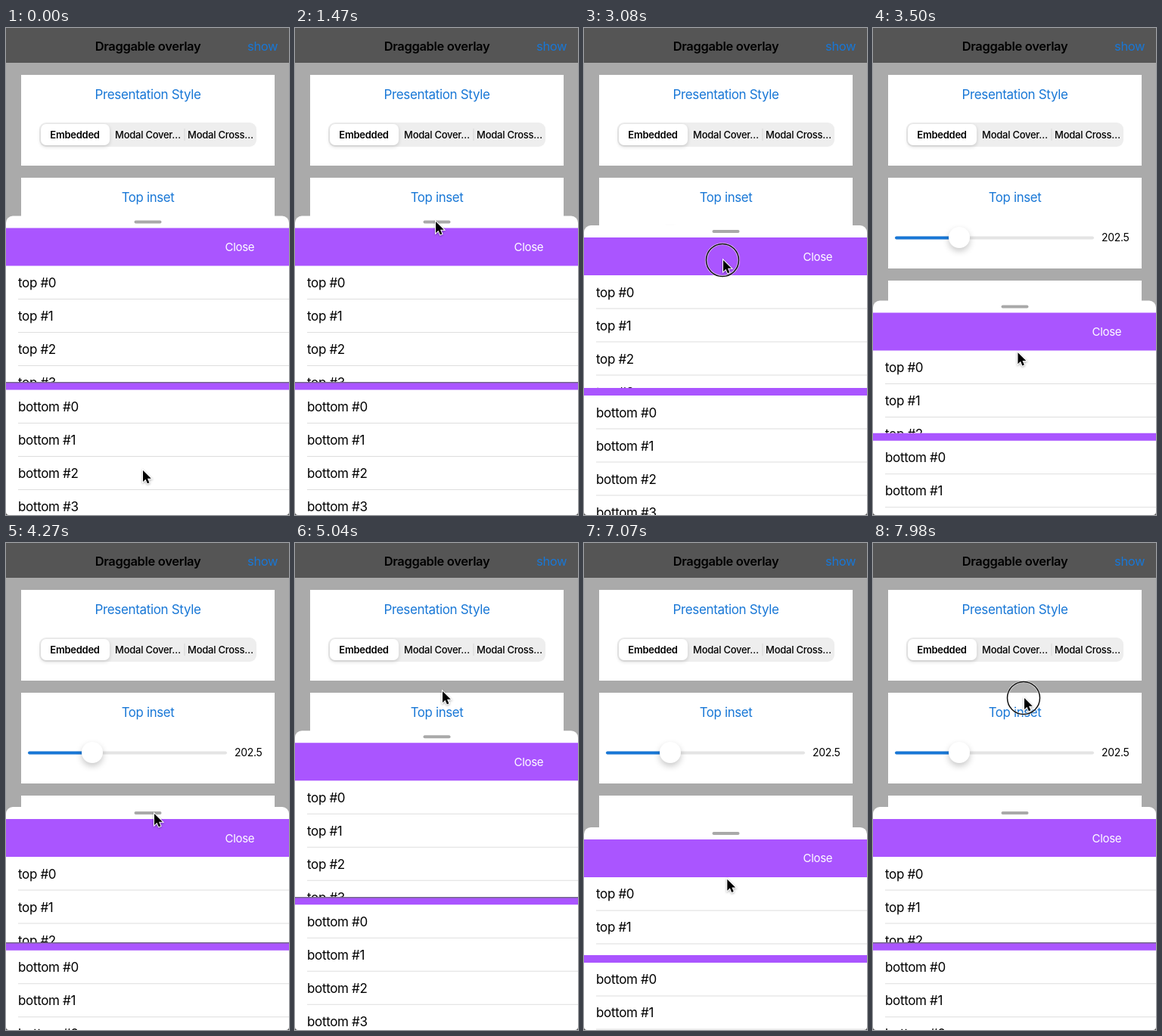
Recreate the animation shown at these times as an HTML page with a canvas. Size 374 px wide and 644 px high, loop 8000 ms.

```html
<!DOCTYPE html>
<html>
<head>
<meta charset="utf-8">
<style>
  html, body { margin: 0; width: 100%; height: 100%; overflow: hidden; background: #aaa; }
  canvas { display: block; }
</style>
</head>
<body>
<canvas id="stage" width="374" height="644"></canvas>
<script>
const W = 374, H = 644, LOOP = 8000;
const BLUE = '#1877d6', PURPLE = '#aa55ff';
const OPEN_Y = 248.5, DROP = 100.5;
const ctx = document.getElementById('stage').getContext('2d');

// Pointer tip: time, x, y
const pointer = [
  [0, 181, 585], [70, 181, 580], [560, 185, 256], [1470, 186, 256], [1540, 185, 257],
  [1650, 185, 257], [1820, 186, 110], [1930, 186, 90], [2240, 181, 150], [2520, 178, 201],
  [2800, 183, 257], [2920, 183, 257], [3080, 184, 307], [3220, 187, 420], [3340, 189, 445],
  [3700, 194, 395], [4000, 196, 360], [4270, 196, 358], [4410, 196, 357], [4550, 197, 205],
  [4680, 197, 99], [4830, 196, 122], [5040, 195, 196], [5390, 196, 270], [5530, 194, 257],
  [5650, 194, 257], [5810, 190, 110], [5900, 188, 92], [6160, 184, 195], [6440, 182, 254],
  [6510, 183, 256], [6630, 183, 257], [6790, 184, 307], [6930, 187, 420], [7050, 189, 445],
  [7420, 195, 390], [7700, 198, 357], [7860, 199, 357], [7980, 200, 205], [8000, 200, 180]
];

// Sheet moves, with times counted from the start of the gesture
const bounce = [[0, 0], [160, -28], [310, -5], [420, -0.6], [560, 0]];
const lower = [[0, 0], [70, 12.5], [210, 90], [330, 128], [490, 112], [700, 101], [790, DROP]];
const raise = [[0, DROP], [160, 5], [270, -18], [400, -3], [480, -0.3], [740, 0]];
const at = (start, keys) => keys.map(([t, d]) => [start + t, d]);
const sheet = [
  [0, 0], ...at(1750, bounce), ...at(3010, lower), ...at(4560, raise),
  ...at(5740, bounce), ...at(6720, lower), [8000, DROP]
];

const presses = [[1640, 1930], [2880, 3290], [4340, 4680], [5640, 5890], [6610, 7000], [7850, 8000]];

// Monotone cubic interpolation of column c
function track(keys, t, c = 1) {
  let i = 0;
  while (i < keys.length - 2 && t >= keys[i + 1][0]) i++;
  const slope = k => k < 0 || k > keys.length - 2 ? 0 :
    (keys[k + 1][c] - keys[k][c]) / (keys[k + 1][0] - keys[k][0]);
  const tangent = k => {
    const a = slope(k - 1), b = slope(k);
    return a * b > 0 ? 2 * a * b / (a + b) : 0;
  };
  const span = keys[i + 1][0] - keys[i][0];
  const u = Math.min(1, Math.max(0, (t - keys[i][0]) / span)), v = 1 - u;
  return v * v * (1 + 2 * u) * keys[i][c] + u * u * (3 - 2 * u) * keys[i + 1][c] +
    span * u * v * (v * tangent(i) - u * tangent(i + 1));
}

function rect(x, y, w, h, color, radius = 0) {
  ctx.fillStyle = color;
  ctx.beginPath();
  ctx.roundRect(x, y, w, h, radius);
  ctx.fill();
}

function text(str, x, y, size, color = '#000', align = 'center', weight = 400) {
  ctx.font = `${weight} ${size}px Inter, "Liberation Sans", sans-serif`;
  ctx.letterSpacing = -0.02 * size + 'px';
  ctx.textAlign = align;
  ctx.fillStyle = color;
  ctx.fillText(str, x, y);
}

function shadowed(blur, dy, alpha, draw) {
  ctx.save();
  ctx.shadowColor = `rgba(0,0,0,${alpha})`;
  ctx.shadowBlur = blur;
  ctx.shadowOffsetY = dy;
  draw();
  ctx.restore();
}

function drawPage() {
  rect(0, 0, W, H, '#aaa');
  rect(0, 0, W, 46, '#555');
  text('Draggable overlay', 187.5, 30, 16.5, '#000', 'center', 600);
  text('show', 319, 30, 16.5, BLUE, 'left');
  for (const y of [62, 198, 334]) rect(20, y, 335, 120, '#fff');

  text('Presentation Style', 187.5, 94, 17, BLUE);
  rect(44, 125, 287, 32, '#eee', 9);
  shadowed(5, 2, 0.16, () => rect(46, 127, 91, 28, '#fff', 7));
  rect(235.5, 133, 1, 16, '#d5d5d5');
  text('Embedded', 91, 145.5, 13, '#000', 'center', 600);
  text('Modal Cover…', 187.5, 145.5, 13, '#000', 'center', 500);
  text('Modal Cross…', 283.5, 145.5, 13, '#000', 'center', 500);

  text('Top inset', 187.5, 230, 16.8, BLUE);
  rect(29, 275.5, 263, 4, '#e4e4e4', 2);
  rect(29, 275.5, 85, 4, BLUE, 2);
  shadowed(9, 4, 0.22, () => rect(100, 263, 28, 28, '#fff', 14));
  text('202.5', 302, 282, 14, '#000', 'left');
}

function drawList(name, top, bottom) {
  ctx.save();
  ctx.beginPath();
  ctx.rect(0, top, W, bottom - top);
  ctx.clip();
  rect(0, top, W, bottom - top, '#fff');
  for (let i = 0, y = top; y < bottom; i++, y += 44) {
    text(`${name} #${i}`, 16, y + 28.5, 17, '#000', 'left');
    rect(16, y + 43.5, W - 16, 1, '#dedede');
  }
  ctx.restore();
}

function drawSheet(d) {
  const y = OPEN_Y + d, bar = 468.5 + 0.6 * d;
  rect(0, y, W, H, '#fff', [9, 9, 0, 0]);
  rect(169.5, y + 6, 36, 4, '#a9a9a9', 2);
  drawList('top', y + 66, bar);
  rect(0, y + 16, W, 50, PURPLE);
  text('Close', 289.5, y + 46.5, 15, '#fff', 'left');
  drawList('bottom', bar + 10, H);
  rect(0, bar, W, 10, PURPLE);
  const resting = Math.min(Math.abs(d), Math.abs(d - DROP)) < 0.4;
  if (resting) rect(0, Math.round(bar - 0.6), W, 1.5, '#75688a');
}

function drawPointer(x, y, pressed) {
  if (pressed) {
    ctx.beginPath();
    ctx.arc(x - 1, y, 21.5, 0, 2 * Math.PI);
    ctx.strokeStyle = 'rgba(255,255,255,.6)';
    ctx.lineWidth = 3.2;
    ctx.stroke();
    ctx.strokeStyle = '#111';
    ctx.lineWidth = 1.5;
    ctx.stroke();
  }
  const arrow = new Path2D('M0 0V15L3.5 11.7 5.9 17.3 8.4 16.2 6 10.8H10.8Z');
  ctx.save();
  ctx.translate(x, y);
  shadowed(3, 1, 0.35, () => {
    ctx.strokeStyle = '#fff';
    ctx.lineWidth = 2;
    ctx.stroke(arrow);
  });
  ctx.fillStyle = '#000';
  ctx.fill(arrow);
  ctx.restore();
}

// Dark slivers left by the rounded window corners
function drawCorners() {
  ctx.fillStyle = '#555';
  ctx.beginPath();
  ctx.rect(0, H - 5, W, 5);
  ctx.roundRect(0, H - 20, W, 20, 5);
  ctx.save();
  ctx.clip('evenodd');
  ctx.fillRect(0, H - 5, 5, 5);
  ctx.fillRect(W - 5, H - 5, 5, 5);
  ctx.restore();
}

function drawScene(t) {
  drawPage();
  drawSheet(track(sheet, t));
  // Only the outer corner slivers should be dark
  for (const x of [0, W]) {
    const s = x ? -1 : 1;
    ctx.fillStyle = '#555';
    ctx.beginPath();
    ctx.moveTo(x, H);
    ctx.lineTo(x, H - 4);
    ctx.quadraticCurveTo(x, H, x + 4 * s, H);
    ctx.fill();
  }
  const pressed = presses.some(([from, to]) => t >= from && t < to);
  drawPointer(track(pointer, t, 1), track(pointer, t, 2), pressed);
}

let start;
function frame(now) {
  start ??= now;
  drawScene((now - start) % LOOP);
  requestAnimationFrame(frame);
}
requestAnimationFrame(frame);
</script>
</body>
</html>
```
